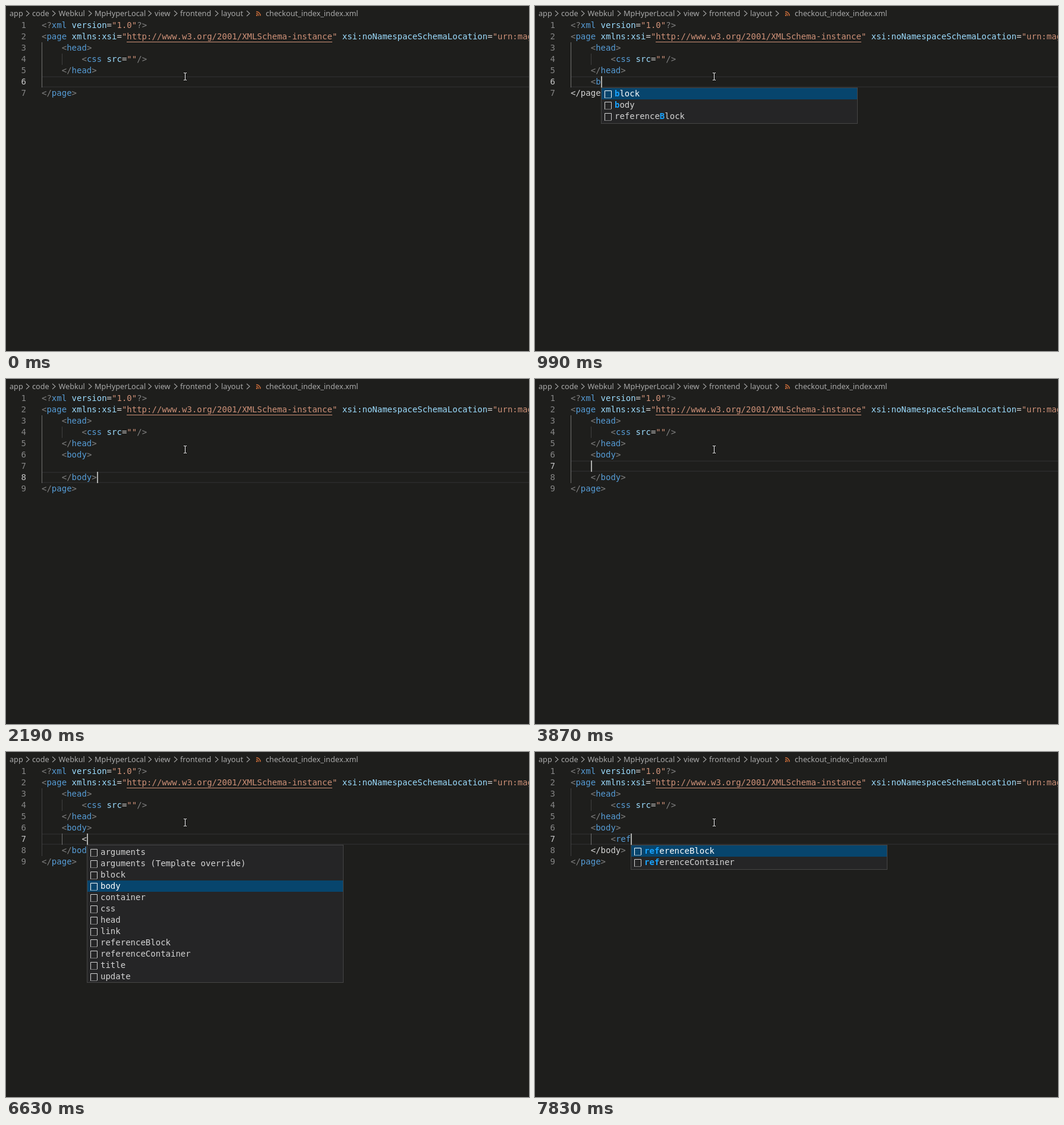
These frames come from a looping animation (880x580 px, 8 s). An HTML page:

```html
<!DOCTYPE html>
<html lang="en">
<head>
<meta charset="utf-8">
<title>Editing a layout file</title>
<style>
  html, body { margin: 0; width: 100%; height: 100%; overflow: hidden; background: #1e1e1c; }
  #stage {
    position: relative; width: 880px; height: 580px; overflow: hidden;
    background: #1e1e1c; color: #d4d4d4;
    font: 14px/19px "DejaVu Sans Mono", monospace; white-space: pre;
  }
  #stage div, #stage svg { position: absolute; box-sizing: border-box; }
  #crumbs, #editor { left: 0; top: 0; width: 880px; height: 580px; }
  #crumbs svg { left: 0; top: 0; }
  .crumb { top: 3px; color: #a9a9a9; font: 12.7px/19px "Noto Sans", sans-serif; }
  .num { left: 0; width: 34px; text-align: right; color: #858585; }
  .num.on { color: #c6c6c6; }
  .code { left: 60px; }
  .row { left: 60px; right: 0; height: 19px; border: 2px solid #282828; border-width: 2px 0; }
  .guide { width: 1px; background: #404040; }
  .guide.on { background: #707070; }
  .link { left: 203px; top: 60px; width: 346px; height: 1px; background: #ce9178; }
  .caret { width: 2px; height: 19px; background: #aeafad; }
  .punct { color: #808080; }
  .tag { color: #569cd6; }
  .attr { color: #9cdcfe; }
  .str { color: #ce9178; }
  .menu { width: 432px; background: #252526; border: 1px solid #454545; }
  .item { left: 0; width: 430px; height: 19px; padding-left: 22px; }
  .item.on { background: #07456d; color: #fff; }
  .item b { color: #18a3ff; }
  .item svg { left: 4px; top: 3px; }
  #pointer { left: 296px; top: 110px; }
</style>
</head>
<body>
<div id="stage">
  <div id="crumbs"></div>
  <div id="editor"></div>
  <svg id="pointer" width="11" height="17" fill="none">
    <path d="M3 2.5h2l.5.5.5-.5h2M5.5 3v11M3 14.5h2l.5-.5.5.5h2" stroke="#000" stroke-width="2.4" opacity=".5"/>
    <path d="M3 2.5h2l.5.5.5-.5h2M5.5 3v11M3 14.5h2l.5-.5.5.5h2" stroke="#fff"/>
  </svg>
</div>
<script>
const LOOP = 8000, LINE = 19, TOP = 23, LEFT = 60, CHAR = 8.428;
const lineTop = n => TOP + (n - 1) * LINE;
const colX = col => Math.round(LEFT + col * CHAR);
const escapeText = s => s.replace(/&/g, '&amp;').replace(/</g, '&lt;');
const span = (cls, s) => s ? `<span class="${cls}">${escapeText(s)}</span>` : '';
const box = (cls, style, html = '') => `<div class="${cls}" style="${style}">${html}</div>`;

const crumbs = [['app', 6], ['code', 44], ['Webkul', 88.5], ['MpHyperLocal', 149],
  ['view', 250], ['frontend', 293], ['layout', 362], ['checkout_index_index.xml', 437]];
const chevrons = [36.5, 80.5, 141.5, 242, 285.5, 354.5, 407.5];
document.getElementById('crumbs').innerHTML =
  crumbs.map(([name, x]) => box('crumb', `left:${x}px`, name)).join('') +
  `<svg width="440" height="24" fill="none">
    <path d="${chevrons.map(x => `M${x - 2.5} 8l5 4.5-5 4.5`).join('')}" stroke="#a0a0a0" stroke-width="1.1"/>
    <path d="M421 9.5a7 7 0 0 1 7 7M421 12.5a4 4 0 0 1 4 4" stroke="#cc6d3a" stroke-width="1.5"/>
    <circle cx="422" cy="15.7" r="1.2" fill="#cc6d3a"/>
  </svg>`;

const head = [
  '<?xml version="1.0"?>',
  '<page xmlns:xsi="http://www.w3.org/2001/XMLSchema-instance" xsi:noNamespaceSchemaLocation="urn:magento:framework',
  '    <head>', '        <css src=""/>', '    </head>'];

const names = ['arguments', 'arguments (Template override)', 'block', 'body', 'container', 'css',
  'head', 'link', 'referenceBlock', 'referenceContainer', 'title', 'update'];
const refs = ['referenceBlock', 'referenceContainer'];

// Each step changes only the listed properties.
const steps = [
  { t: 0, body: false, row: 6, col: 4, caret: false, typed: '', loose: false, menu: null, pick: 0 },
  { t: 30, caret: true },
  { t: 150, typed: '<', col: 5 },
  { t: 270, menu: names, pick: 5 },
  { t: 870, typed: '<b', col: 6, menu: ['block', 'body', 'referenceBlock'], pick: 0 },
  { t: 990, loose: true },
  { t: 1110, typed: '<bo', col: 7, menu: ['body', 'block', 'referenceBlock'] },
  { t: 1950, caret: false },
  { t: 2190, body: true, typed: '', row: 8, col: 11, caret: true, loose: false, menu: null },
  { t: 3150, caret: false },
  { t: 3630, row: 7, col: 4, caret: true },
  { t: 4590, caret: false },
  { t: 5070, col: 8, caret: true },
  { t: 5910, caret: false },
  { t: 6630, typed: '<', col: 9, caret: true, menu: names, pick: 3 },
  { t: 7230, typed: '<r', col: 10, menu: refs, pick: 0 },
  { t: 7350, loose: true },
  { t: 7590, typed: '<re', col: 11 },
  { t: 7830, typed: '<ref', col: 12 }
];
const states = [];
steps.forEach((step, i) => states.push({ ...states[i - 1], ...step }));

function paint(line) {
  if (line.trim() === '<') return escapeText(line);
  return line.replace(/("[^"]*"?)|(<[?\/]?)(\w*)|([?\/]?>)|([\w:]+)/g,
    (all, str, open, tag, close, attr) =>
      span('str', str) + span('punct', open) + span('tag', tag) + span('punct', close) + span('attr', attr));
}

// A closing tag right after an unfinished one loses its colours.
const paintLoose = line => escapeText(line.slice(0, -1)) + span('punct', '>');

function mark(name, query) {
  let i = 0;
  return [...name].map(c =>
    i < query.length && c.toLowerCase() === query[i] ? (i++, `<b>${c}</b>`) : c).join('');
}

const icon = `<svg width="14" height="14" fill="none" stroke="currentColor">
  <path d="M1.5 13V1.5h11V13"/><path d="M1 13.5h12" stroke-dasharray="1 1"/></svg>`;

function drawMenu(s) {
  const offset = s.menu === names ? 2 : 0;
  const items = s.menu.map((name, i) => box(i === s.pick ? 'item on' : 'item',
    `top:${i * LINE + offset}px`, icon + mark(name, s.typed.slice(1))));
  return box('menu', `left:${colX(s.col)}px;top:${lineTop(s.row + 1)}px;height:${s.menu.length * LINE + 4}px`,
    items.join(''));
}

function guide(col, from, to, on) {
  return box(on ? 'guide on' : 'guide',
    `left:${colX(col)}px;top:${lineTop(from)}px;height:${(to - from + 1) * LINE}px`);
}

function draw(s) {
  const lines = s.body
    ? [...head, '    <body>', '        ' + s.typed, '    </body>', '</page>']
    : [...head, '    ' + s.typed, '</page>'];
  const nested = s.body && s.typed !== '';
  let html = box('row', `top:${lineTop(s.row)}px`) +
    guide(0, 3, s.body ? 8 : 6, !nested) + guide(4, 4, 4, false);
  if (nested) html += guide(4, 7, 7, true);
  lines.forEach((line, i) => {
    const n = i + 1, top = `top:${lineTop(n)}px`;
    const text = s.loose && n === s.row + 1 ? paintLoose(line) : paint(line);
    html += box(n === s.row ? 'num on' : 'num', top, n) + box('code', top, text);
  });
  html += box('link', '');
  if (s.caret) html += box('caret', `left:${colX(s.col)}px;top:${lineTop(s.row)}px`);
  if (s.menu) html += drawMenu(s);
  document.getElementById('editor').innerHTML = html;
}

let shown;
const start = performance.now();
function tick() {
  const t = (performance.now() - start) % LOOP;
  const state = states.filter(s => s.t <= t).pop();
  if (state !== shown) draw(shown = state);
  requestAnimationFrame(tick);
}
tick();
</script>
</body>
</html>
```
